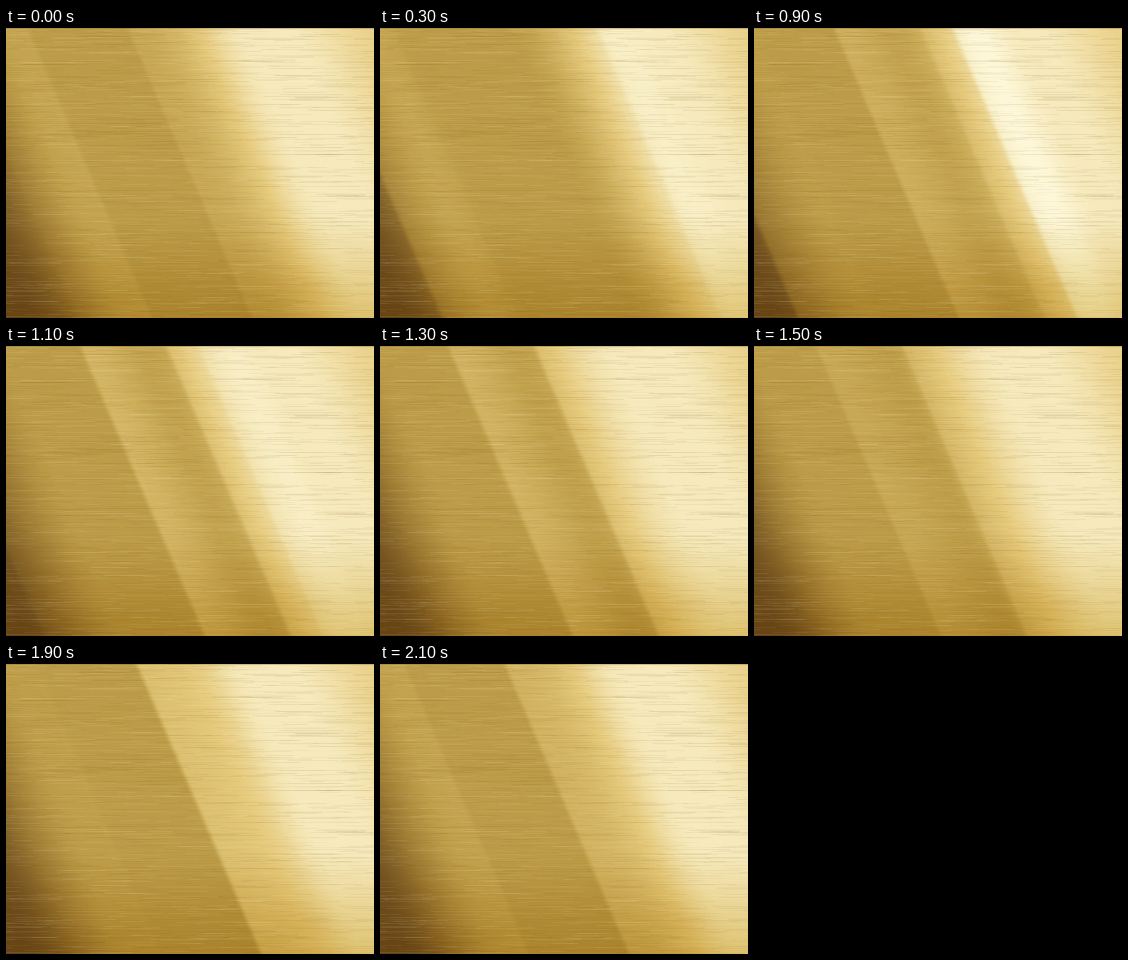
Animation of 368x290 px, one loop 2.2 s. Source, as an HTML page with a canvas:

```html
<!DOCTYPE html>
<html lang="en">
<head>
<meta charset="utf-8">
<title>Brushed gold</title>
<style>
html, body { margin: 0; width: 368px; height: 290px; overflow: hidden; background: #bf9f4a; }
canvas { display: block; }
</style>
</head>
<body>
<canvas id="stage" width="368" height="290"></canvas>
<script>
const W = 368, H = 290, SLANT = 0.43, LOOP = 2200, STEP = 100;
const DRIFT = -0.03; // pixels per ms
const ctx = document.getElementById('stage').getContext('2d');

// Metal colours from shadow to highlight, evenly spaced
const RAMP = ['#6c4c1f', '#9a7832', '#bf9f4a', '#e6ca7c', '#fffbe0'].map(hex =>
  [1, 3, 5].map(i => parseInt(hex.slice(i, i + 2), 16)));

// Each reflection glows around its peak time; a negative width fades to the left
const REFLECTIONS = [
  { edge: 22, width: -70, glow: .05, peak: 0, spread: 500 },
  { edge: -72, width: 95, glow: .2, peak: 600, spread: 750 },
  { edge: 204, width: 70, glow: .15, peak: 700, spread: 600 },
  { edge: 72, width: 85, glow: .15, peak: 1150, spread: 700 },
  { edge: 155, width: 90, glow: .13, peak: 1250, spread: 650 },
  { edge: 130, width: 80, glow: .2, peak: 1900, spread: 500 }
];

const clamp = v => Math.min(1, Math.max(0, v));

function smooth(a, b, v) {
  const p = clamp((v - a) / (b - a));
  return p * p * (3 - 2 * p);
}

function metalColour(tone) {
  const x = clamp(tone) * (RAMP.length - 1), i = Math.min(RAMP.length - 2, Math.floor(x));
  return `rgb(${RAMP[i].map((c, k) => Math.round(c + (RAMP[i + 1][k] - c) * (x - i)))})`;
}

function restTone(u) {
  return .03 + .45 * smooth(-105, 0, u) + .43 * smooth(125, 240, u) - .12 * smooth(280, W, u);
}

function glowAt(u, t) {
  let sum = 0;
  for (const { edge, width, glow, peak, spread } of REFLECTIONS) {
    const age = (t - peak + LOOP * 1.5) % LOOP - LOOP / 2;
    if (Math.abs(age) >= spread) continue;
    const d = (u - edge - DRIFT * age) * Math.sign(width);
    const pulse = Math.cos(age / spread * Math.PI / 2) ** 2;
    sum += glow * pulse * smooth(-3, 4, d) * (1 - smooth(0, Math.abs(width), d));
  }
  return sum;
}

function makeGrain() {
  const layer = document.createElement('canvas');
  layer.width = W;
  layer.height = H;
  const g = layer.getContext('2d');
  let seed = 7;
  const rnd = () => (seed = seed * 16807 % 2147483647) / 2147483647;
  for (let i = 0; i < 3000; i++) {
    const tint = rnd() < .5 ? '255,246,205' : '120,86,24';
    g.fillStyle = `rgba(${tint},${rnd() * .08})`;
    g.fillRect(rnd() * (W + 60) - 60, Math.floor(rnd() * H), 10 + rnd() * 60, 1);
  }
  g.fillStyle = 'rgba(140,105,50,.35)';
  g.fillRect(0, 0, W, 1);
  return layer;
}

const grain = makeGrain();
const shade = ctx.createLinearGradient(0, 190, 0, H);
shade.addColorStop(0, '#fff');
shade.addColorStop(1, '#e6d498');

function draw(t) {
  const left = -SLANT * H, span = W - left;
  const metal = ctx.createLinearGradient(left, 0, W, 0);
  for (let d = 0; d <= span; d += 2) {
    metal.addColorStop(d / span, metalColour(restTone(left + d) + glowAt(left + d, t)));
  }
  ctx.setTransform(1, 0, SLANT, 1, 0, 0);
  ctx.fillStyle = metal;
  ctx.fillRect(left - 5, 0, span + 10, H);
  ctx.resetTransform();
  ctx.globalCompositeOperation = 'multiply';
  ctx.fillStyle = shade;
  ctx.fillRect(0, 0, W, H);
  ctx.globalCompositeOperation = 'source-over';
  ctx.drawImage(grain, 0, 0);
}

let shown = -1;
function tick() {
  const t = Math.floor(performance.now() % LOOP / STEP) * STEP;
  if (t !== shown) draw(shown = t);
  requestAnimationFrame(tick);
}
tick();
</script>
</body>
</html>
```
